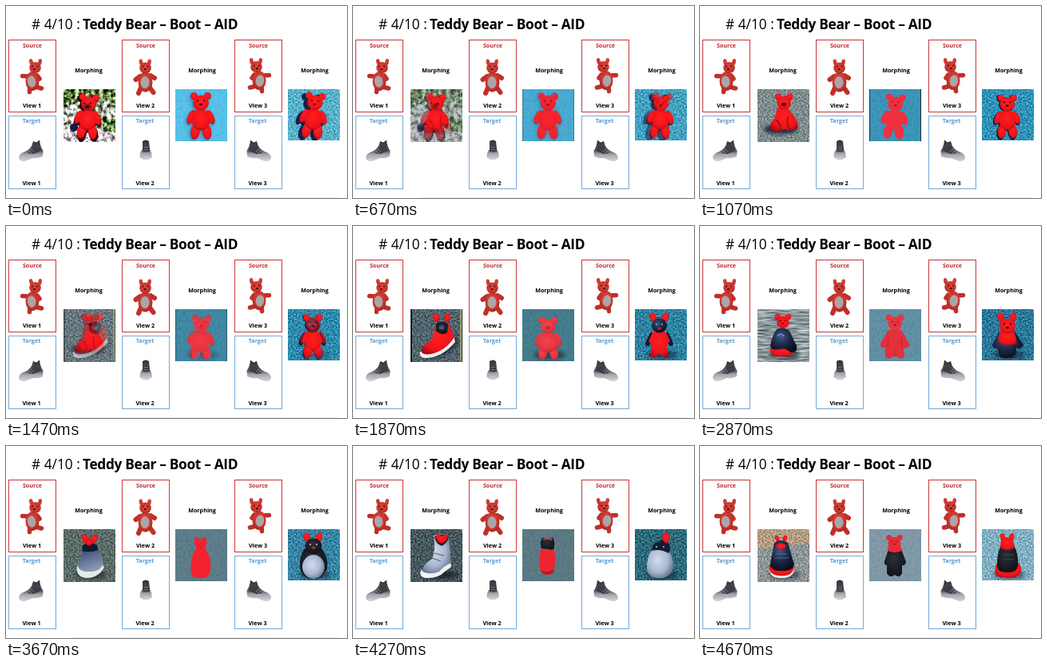
These frames come from a looping animation (427x240 px, 5.07 s). An HTML page:

```html
<!DOCTYPE html>
<html lang="en">
<head>
<meta charset="utf-8">
<title>Teddy Bear – Boot – AID</title>
<style>
html, body { margin: 0; width: 100%; height: 100%; overflow: hidden; background: #fff; }
#stage { display: block; width: 100vw; height: 100vh; }
text { font: 700 7.2px "Open Sans", "Noto Sans", sans-serif; text-anchor: middle; }
.title { font-size: 17.3px; text-anchor: start; letter-spacing: -.32px; }
.count { font-weight: 400; letter-spacing: 0; }
.frame { fill: #fff; stroke-width: 1; }

/* Each scene is half blended in, then stays until later ones cover it. */
.s1, .s2, .s3, .s4, .s5, .s6 { animation: 5070ms step-end infinite; }
.s1 { animation-name: s1; }
.s2 { animation-name: s2; }
.s3 { animation-name: s3; }
.s4 { animation-name: s4; }
.s5 { animation-name: s5; }
.s6 { animation-name: s6; }
@keyframes s1 { 0% { opacity: 0 } 13.214% { opacity: .5 } 21.104%, 100% { opacity: 1 } }
@keyframes s2 { 0% { opacity: 0 } 28.994% { opacity: .5 } 36.883%, 100% { opacity: 1 } }
@keyframes s3 { 0% { opacity: 0 } 48.717% { opacity: .5 } 56.607%, 100% { opacity: 1 } }
@keyframes s4 { 0% { opacity: 0 } 64.497% { opacity: .5 } 72.386%, 100% { opacity: 1 } }
@keyframes s5 { 0% { opacity: 0 } 84.22%, 100% { opacity: 1 } }
@keyframes s6 { 0% { opacity: 0 } 92.11%, 100% { opacity: 1 } }
</style>
</head>
<body>
<svg id="stage" viewBox="0 0 427 240" preserveAspectRatio="none">
<defs>
  <radialGradient id="red" cx=".5" cy=".4" r=".65">
    <stop stop-color="#ff2020"/><stop offset=".7" stop-color="#f0121a"/><stop offset="1" stop-color="#a60a18"/>
  </radialGradient>
  <radialGradient id="rose" cx=".45" cy=".4" r=".65">
    <stop stop-color="#f4444e"/><stop offset=".7" stop-color="#e2363f"/><stop offset="1" stop-color="#b82a38"/>
  </radialGradient>
  <radialGradient id="plush" cx=".45" cy=".4" r=".65">
    <stop stop-color="#d8443a"/><stop offset=".7" stop-color="#c9342c"/><stop offset="1" stop-color="#9c241f"/>
  </radialGradient>
  <radialGradient id="navy" cx=".4" cy=".35" r=".7">
    <stop stop-color="#3f5684"/><stop offset=".5" stop-color="#1d2845"/><stop offset="1" stop-color="#090c18"/>
  </radialGradient>
  <radialGradient id="ink" cx=".45" cy=".4" r=".7">
    <stop stop-color="#2c303a"/><stop offset="1" stop-color="#0c0e14"/>
  </radialGradient>
  <radialGradient id="pale" cx=".42" cy=".42" r=".65">
    <stop stop-color="#d4dcea"/><stop offset=".6" stop-color="#a9b7cf"/><stop offset="1" stop-color="#62708c"/>
  </radialGradient>
  <linearGradient id="bootTone" x2="0" y2="1">
    <stop stop-color="#303038"/><stop offset=".5" stop-color="#55555e"/><stop offset=".68" stop-color="#a5a5ac"/><stop offset="1" stop-color="#d6d6dc"/>
  </linearGradient>
  <linearGradient id="steel" x2=".3" y2="1">
    <stop stop-color="#1b2438"/><stop offset=".5" stop-color="#53658a"/><stop offset="1" stop-color="#8796b0"/>
  </linearGradient>

  <filter id="gravel" x="0" y="0" width="1" height="1" color-interpolation-filters="sRGB">
    <feTurbulence type="fractalNoise" baseFrequency=".2" numOctaves="3" seed="4"/>
    <feColorMatrix values="1 0 0 0 0  1 0 0 0 0  1 0 0 0 0  0 0 0 0 1" result="n"/>
    <feComposite in="SourceGraphic" in2="n" operator="arithmetic" k2="1" k3="2.2" k4="-1.1"/>
  </filter>
  <filter id="rough" x="0" y="0" width="1" height="1" color-interpolation-filters="sRGB">
    <feTurbulence type="fractalNoise" baseFrequency=".5" numOctaves="2" seed="4"/>
    <feColorMatrix values="1 0 0 0 0  1 0 0 0 0  1 0 0 0 0  0 0 0 0 1" result="n"/>
    <feComposite in="SourceGraphic" in2="n" operator="arithmetic" k2="1" k3=".7" k4="-.35"/>
  </filter>
  <filter id="soft" x="0" y="0" width="1" height="1" color-interpolation-filters="sRGB">
    <feTurbulence type="fractalNoise" baseFrequency=".3" numOctaves="2" seed="9"/>
    <feColorMatrix values="1 0 0 0 0  1 0 0 0 0  1 0 0 0 0  0 0 0 0 1" result="n"/>
    <feComposite in="SourceGraphic" in2="n" operator="arithmetic" k2="1" k3=".1" k4="-.05"/>
  </filter>
  <filter id="planks" x="0" y="0" width="1" height="1" color-interpolation-filters="sRGB">
    <feTurbulence type="fractalNoise" baseFrequency=".06 .5" numOctaves="2" seed="7"/>
    <feColorMatrix values="1 0 0 0 0  1 0 0 0 0  1 0 0 0 0  0 0 0 0 1" result="n"/>
    <feComposite in="SourceGraphic" in2="n" operator="arithmetic" k2="1" k3=".9" k4="-.45"/>
  </filter>
  <filter id="blur" x="-30%" y="-30%" width="160%" height="160%"><feGaussianBlur stdDeviation="2"/></filter>

  <rect id="bg" width="66" height="67"/>
  <ellipse id="shade" cx="34" cy="57" rx="20" ry="6" fill="#0a1420" opacity=".5" filter="url(#blur)"/>

  <g id="head">
    <circle cx="23.500" cy="8.500" r="4.500"/><circle cx="40.500" cy="8.500" r="4.500"/>
    <ellipse cx="32" cy="17" rx="10" ry="9.500"/>
  </g>
  <g id="bear">
    <ellipse cx="20" cy="35" rx="4.500" ry="9.500" transform="rotate(24 20 35)"/>
    <ellipse cx="44" cy="35" rx="4.500" ry="9.500" transform="rotate(-24 44 35)"/>
    <ellipse cx="25" cy="53" rx="5.800" ry="10" transform="rotate(8 25 53)"/>
    <ellipse cx="39.500" cy="53" rx="5.800" ry="10" transform="rotate(-8 39.500 53)"/>
    <ellipse cx="32" cy="38" rx="11.500" ry="13.500"/>
    <use href="#head"/>
  </g>
  <g id="face">
    <circle cx="28" cy="14.500" r="1.100"/><circle cx="36" cy="14.500" r="1.100"/>
    <ellipse cx="32" cy="19" rx="2" ry="1.300"/>
  </g>
  <g id="ears">
    <ellipse cx="24" cy="10" rx="4" ry="6" transform="rotate(-18 24 10)"/>
    <ellipse cx="39" cy="10" rx="4" ry="6" transform="rotate(18 39 10)"/>
  </g>

  <g id="toySide" fill="url(#plush)">
    <g stroke="#bf3029" stroke-width="5.500" stroke-linecap="round">
      <path d="M28 88L20.500 87.500M30 102L29.500 107.500M37 101L44.500 103M39 87L42 91"/>
    </g>
    <ellipse cx="31.500" cy="70" rx="2.300" ry="4" transform="rotate(-15 31.500 70)"/>
    <ellipse cx="42.500" cy="70" rx="2.300" ry="4" transform="rotate(12 42.500 70)"/>
    <ellipse cx="33" cy="94" rx="8.500" ry="12"/>
    <ellipse cx="36.500" cy="77" rx="7.300" ry="7"/>
    <ellipse cx="32" cy="94.500" rx="5.200" ry="7.200" fill="#aaa6a8" transform="rotate(-10 32 94)"/>
    <g fill="#301010"><circle cx="33" cy="75.500" r=".9"/><circle cx="39" cy="75.500" r=".9"/><ellipse cx="35.500" cy="79" rx="1.600" ry="1"/></g>
  </g>
  <g id="toyFront" fill="url(#plush)">
    <path d="M168 88L162.500 92M181 87L186 90M169 102L166 109M180 102L184.500 108" stroke="#bf3029" stroke-width="6" stroke-linecap="round"/>
    <ellipse cx="169" cy="70.500" rx="2.300" ry="4" transform="rotate(-12 169 70)"/>
    <ellipse cx="179.500" cy="70.500" rx="2.300" ry="4" transform="rotate(12 179.500 70)"/>
    <ellipse cx="174.500" cy="95" rx="9" ry="12.500"/>
    <ellipse cx="174.500" cy="77.500" rx="7.300" ry="7"/>
    <ellipse cx="174" cy="95.500" rx="5.500" ry="7.500" fill="#aaa6a8"/>
    <g fill="#301010"><circle cx="171.500" cy="75.500" r=".9"/><circle cx="177.500" cy="75.500" r=".9"/><ellipse cx="174" cy="79" rx="1.600" ry="1"/></g>
  </g>
  <g id="bootSide">
    <path fill="url(#bootTone)" d="M34 169L38 170.500L42 167.500Q42.500 175 46.500 181L46 188Q40 191 34 190L24 194Q16 195 16 189Q17 184 24 182Q32 179 34 169Z"/>
    <path d="M34 175Q33 181 27 184L34 185L44 181L42 176Z" fill="#3d3d46"/>
    <path d="M31 179L35 182M29 181.500L33 184" stroke="#a0a0a8" stroke-width=".7"/>
  </g>
  <g id="bootFront">
    <path fill="url(#bootTone)" d="M171 169Q175 166 179 169L180 179Q183 184 183 189Q175 196 167.500 189Q167 184 171 179Z"/>
    <path d="M172 174H179L180 181Q175 184 171 181Z" fill="#3d3d46"/>
    <path d="M173 176.500H178M173 179.500H178" stroke="#8b8b94" stroke-width=".7"/>
  </g>

  <g id="card">
    <rect class="frame" x="3.500" y="42.500" width="59" height="90" stroke="#c8373a"/>
    <rect class="frame" x="3.500" y="137.500" width="59" height="91" stroke="#74a9d8"/>
    <text x="33" y="52" fill="#c0272d">Source</text>
    <text x="32" y="146" fill="#5b9bd0">Target</text>
    <text x="103.500" y="83">Morphing</text>
  </g>
</defs>

<rect width="427" height="240" fill="#fff"/>
<path d="M83 239.500H418" stroke="#eee"/>
<text class="title count" x="32" y="29"># 4/10 :</text>
<text class="title" x="96" y="29">Teddy Bear – Boot – AID</text>

<use href="#card"/><use href="#card" x="142"/><use href="#card" x="283"/>
<text x="32.500" y="127">View 1</text><text x="32" y="224">View 1</text>
<text x="174.500" y="127">View 2</text><text x="174" y="224">View 2</text>
<text x="315.500" y="127">View 3</text><text x="315" y="224">View 3</text>
<use href="#toySide"/><use href="#toyFront"/>
<use href="#toySide" transform="translate(350 -1) scale(-1 1)"/>
<use href="#bootSide"/><use href="#bootFront"/>
<use href="#bootSide" transform="translate(348 0) scale(-1 1)"/>

<!-- View 1 -->
<svg x="72" y="104" width="65" height="66">
  <g>
    <g filter="url(#gravel)">
      <use href="#bg" fill="#8c9c7c"/>
      <path d="M0 0H66V18Q48 14 40 6L20 14L0 20Z" fill="#638048"/>
      <path d="M0 22L20 16L16 40L0 50ZM44 18L66 24V36L50 34Z" fill="#c4ccc0"/>
      <path d="M0 50Q30 44 66 54V67H0Z" fill="#d8ccd0"/>
      <path d="M48 36L66 38V54L50 52Z" fill="#56783c"/>
    </g>
    <use href="#bear" fill="#2b0a16" transform="translate(-2 3)"/>
    <ellipse cx="13" cy="48" rx="5" ry="5" fill="#151a4c"/>
    <use href="#bear" fill="url(#red)" transform="rotate(4 32 32) translate(0 2) scale(.96)"/>
    <ellipse cx="30" cy="22" rx="5" ry="4" fill="#8f1519"/>
    <use href="#face" fill="#21080a" transform="translate(-2 3)"/>
  </g>
  <g class="s1">
    <use href="#bg" fill="#7d8c8c" filter="url(#rough)"/>
    <ellipse cx="29" cy="50" rx="21" ry="6" fill="#11142a" opacity=".8" filter="url(#blur)"/>
    <path d="M25 24Q38 20 41 28Q51 38 51 48Q44 54 34 50Q24 55 16 50Q14 44 21 37Z" fill="url(#red)"/>
    <path d="M23 38Q30 44 29 52M38 34Q36 44 40 50" fill="none" stroke="#8e0b18" stroke-width="1.500"/>
    <use href="#head" fill="url(#red)" transform="translate(5 2) scale(.88)"/>
    <ellipse cx="33" cy="19" rx="3" ry="2.200" fill="#4a0c14"/>
  </g>
  <g class="s2">
    <use href="#bg" fill="#50646e" filter="url(#rough)"/>
    <path d="M0 0H2V66H0Z" fill="#151b20"/><path d="M62.500 0H64V66H62.500Z" fill="#b9bf55"/><path d="M64 0H66V66H64Z" fill="#14181a"/>
    <path d="M16 61Q42 64 61 42L54 32Z" fill="#10161c" opacity=".65" filter="url(#blur)"/>
    <path d="M12 53Q10 61 20 61Q40 60 56 41L54 33Z" fill="#f1eef0"/>
    <path d="M31 20Q42 14 48 19L55 35Q44 52 26 56Q13 58 13 51Q16 44 27 38Z" fill="url(#red)"/>
    <path d="M32 18Q40 12 47 19L46 29Q39 34 32 27Z" fill="url(#ink)"/>
    <ellipse cx="39" cy="23" rx="3.500" ry="2.500" fill="#3e5670"/>
    <use href="#ears" fill="url(#red)" transform="translate(9 1) scale(.95)"/>
  </g>
  <g class="s3">
    <use href="#bg" fill="#8c979a" filter="url(#planks)"/>
    <use href="#shade"/>
    <path d="M16 49Q14 59 28 59Q44 60 47 50L40 44Z" fill="url(#red)"/>
    <path d="M24 25Q33 21 40 27L49 46Q51 55 41 54Q36 48 28 50Q17 52 16 46Q18 33 24 25Z" fill="url(#navy)"/>
    <path d="M25 34Q29 28 33 34" fill="none" stroke="#6187b8" stroke-width="2"/>
    <use href="#head" fill="url(#red)" transform="translate(7 3) scale(.78)"/>
    <use href="#face" fill="#270509" transform="translate(7 3) scale(.78)"/>
  </g>
  <g class="s4">
    <use href="#bg" fill="#5b6c68" filter="url(#rough)"/>
    <use href="#shade"/>
    <path d="M17 46Q15 60 29 61Q43 61 51 48L47 41Z" fill="#e4e8ea"/>
    <path d="M24 20Q34 15 42 20L50 42Q48 52 35 53Q19 54 18 46Q19 39 23 34Z" fill="url(#steel)"/>
    <path d="M24 20Q33 15 42 20L43 26Q33 30 23 27Z" fill="#111a2e"/>
    <g fill="url(#red)"><ellipse cx="27" cy="12" rx="4" ry="6" transform="rotate(-35 27 12)"/><ellipse cx="38" cy="12" rx="4" ry="6" transform="rotate(35 38 12)"/><circle cx="32" cy="17" r="3.500"/></g>
  </g>
  <g class="s5">
    <use href="#bg" fill="#46585c" filter="url(#rough)"/>
    <ellipse cx="37" cy="57" rx="22" ry="5" fill="#0c1218" opacity=".7" filter="url(#blur)"/>
    <path d="M13 51Q10 60 20 61Q34 62 43 53L51 47L50 39Z" fill="#f0f2f3"/>
    <path d="M29 8Q39 4 48 9L51 42Q42 46 36 53Q23 58 14 52Q16 44 27 37Q32 28 29 8Z" fill="url(#pale)"/>
    <path d="M30 9Q39 5 48 9Q47 17 39 21Q31 18 30 9Z" fill="#251824"/>
    <path d="M31 9Q35 4 39 9Q44 4 47 9Q46 15 39 18Q33 16 31 9Z" fill="url(#red)"/>
    <path d="M30 30L42 33M27 36L38 40" stroke="#4a5874" stroke-width="1"/>
  </g>
  <g class="s6">
    <g filter="url(#rough)"><use href="#bg" fill="#8d9597"/><path d="M0 0H66V17L0 25Z" fill="#b39c82"/></g>
    <use href="#shade"/>
    <path d="M16 46Q13 60 27 61Q45 62 46 50L43 42Z" fill="#f0e8e8"/>
    <path d="M15 44Q13 57 27 58Q44 60 46 47Z" fill="url(#red)"/>
    <path d="M21 17Q29 11 38 17L46 44Q44 53 31 52Q16 53 16 43Q18 31 21 17Z" fill="url(#navy)"/>
    <use href="#ears" fill="url(#red)" transform="translate(9 5) scale(.65)"/>
    <path d="M23 20Q29 15 36 20Q35 25 29 25Q24 25 23 20Z" fill="url(#red)"/>
    <path d="M23 31L37 31M22 36L39 36" stroke="#536992"/>
  </g>
</svg>

<!-- View 2 -->
<svg x="212" y="104" width="65" height="65">
  <g>
    <use href="#bg" fill="#57c0e8" filter="url(#soft)"/>
    <use href="#bear" fill="#1f6d9c" opacity=".6" transform="translate(-2 2)" filter="url(#blur)"/>
    <use href="#bear" fill="url(#red)"/><use href="#face" fill="#420710"/>
  </g>
  <g class="s1">
    <use href="#bg" fill="#3b93b8" filter="url(#soft)"/>
    <path d="M0 0H1V65H0ZM64 0H65V65H64Z" fill="#1c3038"/>
    <use href="#bear" fill="#f0303f" transform="rotate(4 32 32) translate(1 2) scale(.96)"/>
    <use href="#face" fill="#a3182a" transform="translate(2 2) scale(.96)"/>
  </g>
  <g class="s2">
    <use href="#bg" fill="#447c8c" filter="url(#soft)"/>
    <use href="#shade"/>
    <use href="#bear" fill="url(#rose)" transform="translate(2 6) scale(.95 .91)"/>
    <ellipse cx="32" cy="42" rx="14" ry="12" fill="url(#rose)"/>
    <ellipse cx="32" cy="23" rx="3.500" ry="2.500" fill="#c52f3b"/>
  </g>
  <g class="s3">
    <use href="#bg" fill="#608fa4" filter="url(#soft)"/>
    <path d="M23 27Q32 23 41 27L51 45Q48 50 43 48L44 60Q38 64 34 59H30Q25 64 20 60L20 48Q13 50 14 43Z" fill="#e42f3c"/>
    <use href="#head" fill="#e93440" transform="translate(4 3) scale(.88)"/>
    <use href="#face" fill="#861725" transform="translate(4 3) scale(.88)"/>
    <path d="M24 36L23 47M40 36L41 47M32 51V59" stroke="#b3202e"/>
  </g>
  <g class="s4">
    <use href="#bg" fill="#5c7c89" filter="url(#soft)"/>
    <path d="M27 23Q21 16 25 10Q29 9 31 15Q34 9 38 10Q41 17 37 24Q44 32 44 44Q45 58 38 61H24Q18 58 20 43Q20 31 27 23Z" fill="#f2232d"/>
    <path d="M29 20H30M34 20H35M31 23H33" stroke="#a01821"/>
  </g>
  <g class="s5">
    <use href="#bg" fill="#5b7982" filter="url(#soft)"/>
    <path d="M24 24Q21 14 26 10L29 13H33L38 10Q42 16 39 26Z" fill="url(#ink)"/>
    <path d="M25 13L28 10L30 14ZM33 14L37 10L38 14Z" fill="#d5222c"/>
    <path d="M24 24Q32 28 39 25Q43 34 40 50Q39 57 31 57Q24 57 22 49Q20 34 24 24Z" fill="#ed2531"/>
    <path d="M23 51Q31 55 40 50Q39 57 31 57Q25 57 23 51Z" fill="#b51b27"/>
  </g>
  <g class="s6">
    <use href="#bg" fill="#7e98a7" filter="url(#soft)"/>
    <path d="M24 25Q32 21 40 25L46 41Q45 46 41 45L41 55Q38 62 32 57Q26 62 22 55L22 45Q18 45 19 40Z" fill="url(#ink)"/>
    <use href="#head" fill="#e82a36" transform="translate(6.500 4) scale(.78)"/>
    <path d="M24 20H39L41 27Q32 31 23 27Z" fill="#e82a36"/>
    <use href="#face" fill="#8a1722" transform="translate(6.500 4) scale(.78)"/>
  </g>
</svg>

<!-- View 3 -->
<svg x="353" y="104" width="65" height="64">
  <g>
    <use href="#bg" fill="#57b1ca" filter="url(#rough)"/>
    <use href="#bear" fill="#16204a" transform="rotate(5 32 32) translate(-4 2)"/>
    <use href="#bear" fill="url(#red)" transform="rotate(6 32 32) translate(1 0) scale(.98)"/>
    <use href="#face" fill="#6b0d18" transform="rotate(6 32 32)"/>
  </g>
  <g class="s1">
    <use href="#bg" fill="#2f92b6" filter="url(#rough)"/>
    <use href="#bear" fill="#141a38" transform="translate(0 3) scale(.96)"/>
    <use href="#bear" fill="url(#red)" transform="translate(2 3) scale(.93)"/>
    <use href="#face" fill="#180810" transform="translate(2 3) scale(.93)"/>
  </g>
  <g class="s2">
    <use href="#bg" fill="#2e83a3" filter="url(#rough)"/>
    <use href="#shade"/>
    <use href="#ears" fill="url(#red)" transform="translate(-1 0)"/>
    <path d="M21 32L16 43M40 32L45 43" stroke="#131935" stroke-width="6" stroke-linecap="round"/>
    <path d="M22 29Q31 25 39 29L44 40L40 44L42 59Q36 63 31 54Q26 63 19 59L21 44L17 40Z" fill="url(#red)"/>
    <ellipse cx="30.500" cy="20.500" rx="9.500" ry="9" fill="url(#navy)"/>
    <g fill="#a3b3d0"><circle cx="27" cy="19" r=".9"/><circle cx="34" cy="19" r=".9"/></g>
    <ellipse cx="30.500" cy="24" rx="2.500" ry="1.500" fill="#bd2030"/>
  </g>
  <g class="s3">
    <use href="#bg" fill="#2b7899" filter="url(#rough)"/>
    <use href="#shade"/>
    <path d="M21 29Q31 24 42 29L52 45Q47 52 43 48Q44 62 32 61Q20 63 20 49Q14 51 13 44Z" fill="url(#navy)"/>
    <path d="M22 29Q31 25 41 29L44 43Q33 48 20 41Z" fill="url(#red)"/>
    <use href="#ears" fill="url(#red)"/>
    <ellipse cx="32" cy="21" rx="10" ry="9" fill="url(#red)"/>
    <use href="#face" fill="#25060d" transform="translate(0 4)"/>
  </g>
  <g class="s4">
    <use href="#bg" fill="#3784a5" filter="url(#rough)"/>
    <use href="#shade"/>
    <path d="M20 25Q32 20 43 25Q51 36 49 49Q44 62 32 62Q18 62 15 48Q14 35 20 25Z" fill="url(#ink)"/>
    <ellipse cx="32" cy="47" rx="14" ry="15" fill="url(#pale)"/>
    <use href="#ears" fill="url(#red)"/>
    <ellipse cx="32" cy="21" rx="10.500" ry="9.500" fill="url(#ink)"/>
    <g fill="#cbd5e2"><circle cx="28" cy="19" r="1"/><circle cx="36" cy="19" r="1"/></g>
    <ellipse cx="32" cy="23" rx="2.500" ry="1.500" fill="#c8202c"/>
  </g>
  <g class="s5">
    <use href="#bg" fill="#2d6a7b" filter="url(#rough)"/>
    <use href="#shade"/>
    <path d="M22 25Q33 18 43 27Q51 42 46 54Q40 62 29 61Q17 61 15 51Q14 36 22 25Z" fill="url(#pale)"/>
    <path d="M21 27Q22 16 29 16L35 12L43 18Q46 25 42 30Q32 24 21 27Z" fill="#171c31"/>
    <path d="M34 13Q34 4 40 4Q45 7 42 13Q44 17 39 18Z" fill="url(#red)"/>
    <g fill="#bdc9dc"><circle cx="27" cy="22" r="1"/><circle cx="36" cy="22" r="1"/></g>
  </g>
  <g class="s6">
    <use href="#bg" fill="#80b0c1" filter="url(#rough)"/>
    <use href="#shade"/>
    <path d="M18 43Q12 60 27 60Q45 63 49 53Q50 47 46 42Z" fill="url(#red)"/>
    <path d="M24 20Q32 16 40 20Q46 31 45 45Q44 55 31 54Q18 54 19 43Q19 30 24 20Z" fill="url(#ink)"/>
    <use href="#ears" fill="url(#red)" transform="translate(8 2) scale(.75)"/>
    <path d="M24 13Q32 8 39 13L41 24Q32 28 23 24Z" fill="url(#red)"/>
    <path d="M26 32H40M25 38H41" stroke="#3b4252"/>
  </g>
</svg>
</svg>
</body>
</html>
```
